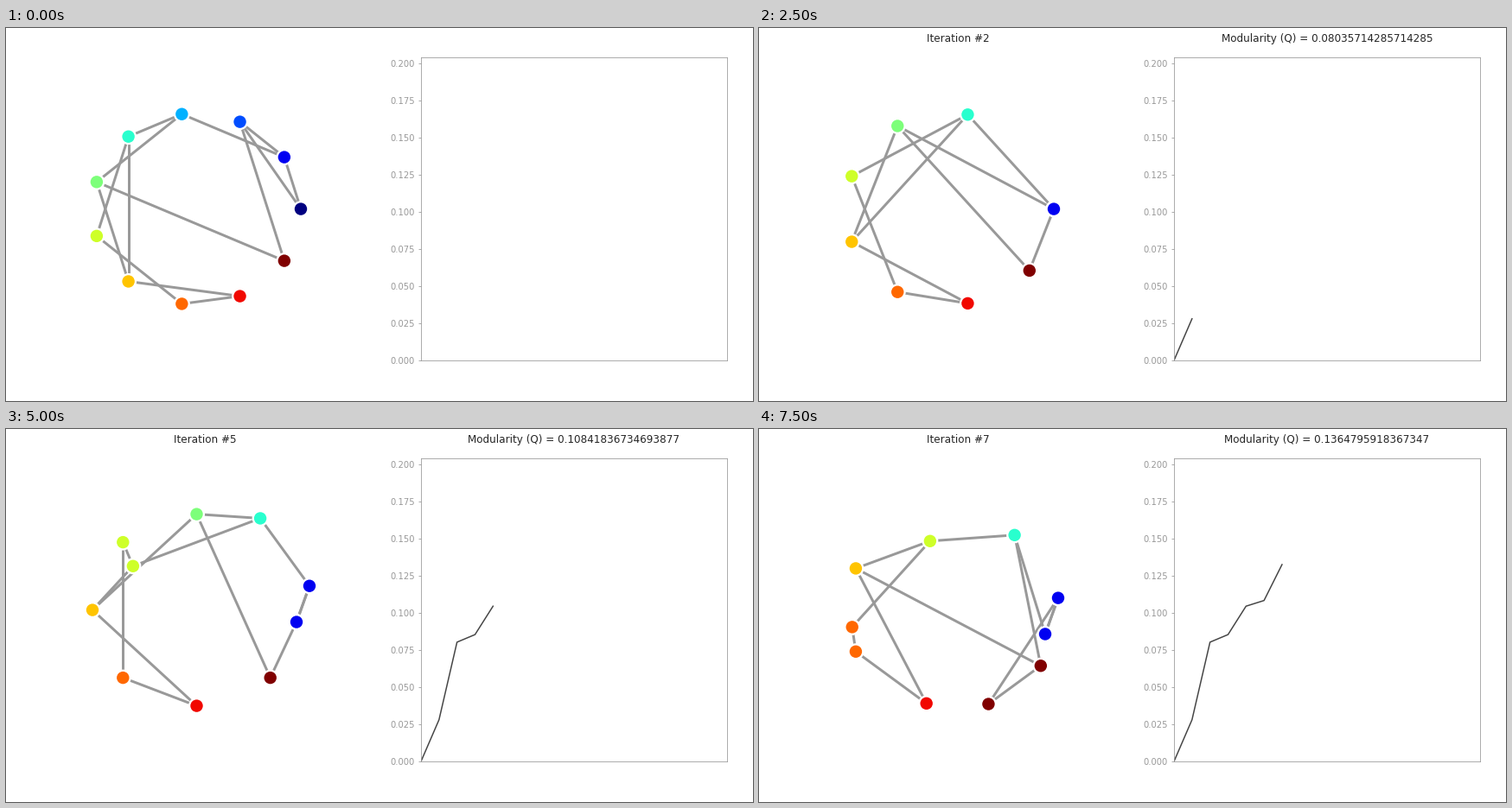
A matplotlib script that plays this animation: 864 by 432 pixels, repeating every 8 s.

```python
import math

import matplotlib.pyplot as plt
from matplotlib.animation import FuncAnimation
from matplotlib.patches import Circle

W, H, DPI = 864, 432, 72
N = 11
EDGES = [(0, 1), (0, 2), (1, 2), (1, 3), (2, 10), (3, 4), (3, 5), (4, 6),
         (4, 7), (5, 7), (5, 10), (6, 8), (7, 9), (8, 9)]
# (node, community it joins), one per iteration
MOVES = [(0, 1), (2, 1), (3, 1), (3, 4), (4, 6), (5, 4), (5, 10), (6, 8)]
SCORES = [0.0, 0.028061224489795915, 0.08035714285714285, 0.08545918367346939,
          0.10459183673469388, 0.10841836734693877, 0.13265306122448978,
          0.1364795918367347]
FIRST_SPREAD = 3   # communities stay collapsed before this iteration
CREEP = 0.137      # part of its offset a node takes as an iteration begins


def labels_after(count):
    labels = list(range(N))
    for node, community in MOVES[:max(count, 0)]:
        labels[node] = community
    return labels


def polar(cx, cy, rx, ry, angle):
    return cx + rx * math.cos(angle), cy - ry * math.sin(angle)


def hops(a, b):
    if a == b:
        return 0
    return 1 if (min(a, b), max(a, b)) in EDGES else 2


def spread(state):
    """Offset of each node from its community centre: members line up
    by their distance from a leading node, balanced around the centre."""
    labels = labels_after(state)
    size = len(set(labels))
    axis = {1: 78 + 180 * state, 3: 78, 4: -76 - 9 * (8 - size), 5: 51}
    offsets = [(0, 0)] * N
    if state < FIRST_SPREAD:
        return offsets
    for label in set(labels):
        group = [k for k in range(N) if labels[k] == label]
        if len(group) == 1:
            continue
        lead = max(k for k in group if k in axis)
        mean = sum(hops(lead, k) for k in group) / len(group)
        dx, dy = polar(0, 0, 48, 28.5, math.radians(axis[lead]))
        for k in group:
            part = 1 - hops(lead, k) / mean
            offsets[k] = (dx * part, dy * part)
    return offsets


def layout(step):
    """Community labels and pixel positions of all nodes."""
    state = (step - 1) // 2
    labels = labels_after(state + 1)
    slots = sorted(set(labels_after(state)))
    offsets = spread(state)
    if step and step % 2 == 0:
        mover = MOVES[state + 1][0]
        ahead = spread(state + 1)[mover]
        offsets[mover] = tuple(o + CREEP * a for o, a in zip(offsets[mover], ahead))
    pos = []
    for label, (dx, dy) in zip(labels, offsets):
        angle = 2 * math.pi * slots.index(label) / len(slots)
        pos.append(polar(220.5 + dx, 209.6 + dy, 120.5, 111, angle))
    return labels, pos


plt.rcParams["font.family"] = "DejaVu Sans"
fig = plt.figure(figsize=(W / DPI, H / DPI), dpi=DPI, facecolor="white")

stage = fig.add_axes([0, 0, 1, 1])
stage.set(xlim=(0, W), ylim=(H, 0))
stage.axis("off")
links = [stage.plot([], [], color="0.6", lw=3, zorder=1)[0] for _ in EDGES]
rings, dots = [], []
for k in range(N):
    rings.append(stage.add_patch(Circle((0, 0), 9.5, fc="white", lw=0, zorder=2 + k)))
    dots.append(stage.add_patch(Circle((0, 0), 7.2, lw=0, zorder=2.5 + k)))
left_title = stage.text(230.5, 16, "", size=12, color="0.15", ha="center")
right_title = stage.text(657, 16, "", size=12, color="0.15", ha="center")

chart = fig.add_axes([480 / W, 1 - 385 / H, 354 / W, 350.8 / H])
chart.patch.set_visible(False)
chart.set(xlim=(0, 17), ylim=(0, 160 / 784), xticks=[],
          yticks=[0.025 * k for k in range(9)])
chart.yaxis.set_major_formatter("{x:.3f}")
chart.tick_params(colors="0.6", labelsize=10)
for spine in chart.spines.values():
    spine.set(color="0.6", linewidth=0.8)
curve, = chart.plot([], [], color="0.27", lw=1.5)


def draw(step):
    labels, pos = layout(step)
    for link, (a, b) in zip(links, EDGES):
        link.set_data(*zip(pos[a], pos[b]))
    for ring, dot, label, p in zip(rings, dots, labels, pos):
        ring.center = dot.center = p
        dot.set_facecolor(plt.cm.jet(label / (N - 1)))
    n = step // 2
    left_title.set_text(f"Iteration #{n}" if step else "")
    right_title.set_text(f"Modularity (Q) = {SCORES[n]}" if step else "")
    curve.set_data(range(n), SCORES[:n])
    return []


anim = FuncAnimation(fig, draw, frames=16, interval=500, repeat=True,
                     repeat_delay=0, init_func=lambda: draw(0))
plt.show()
```
